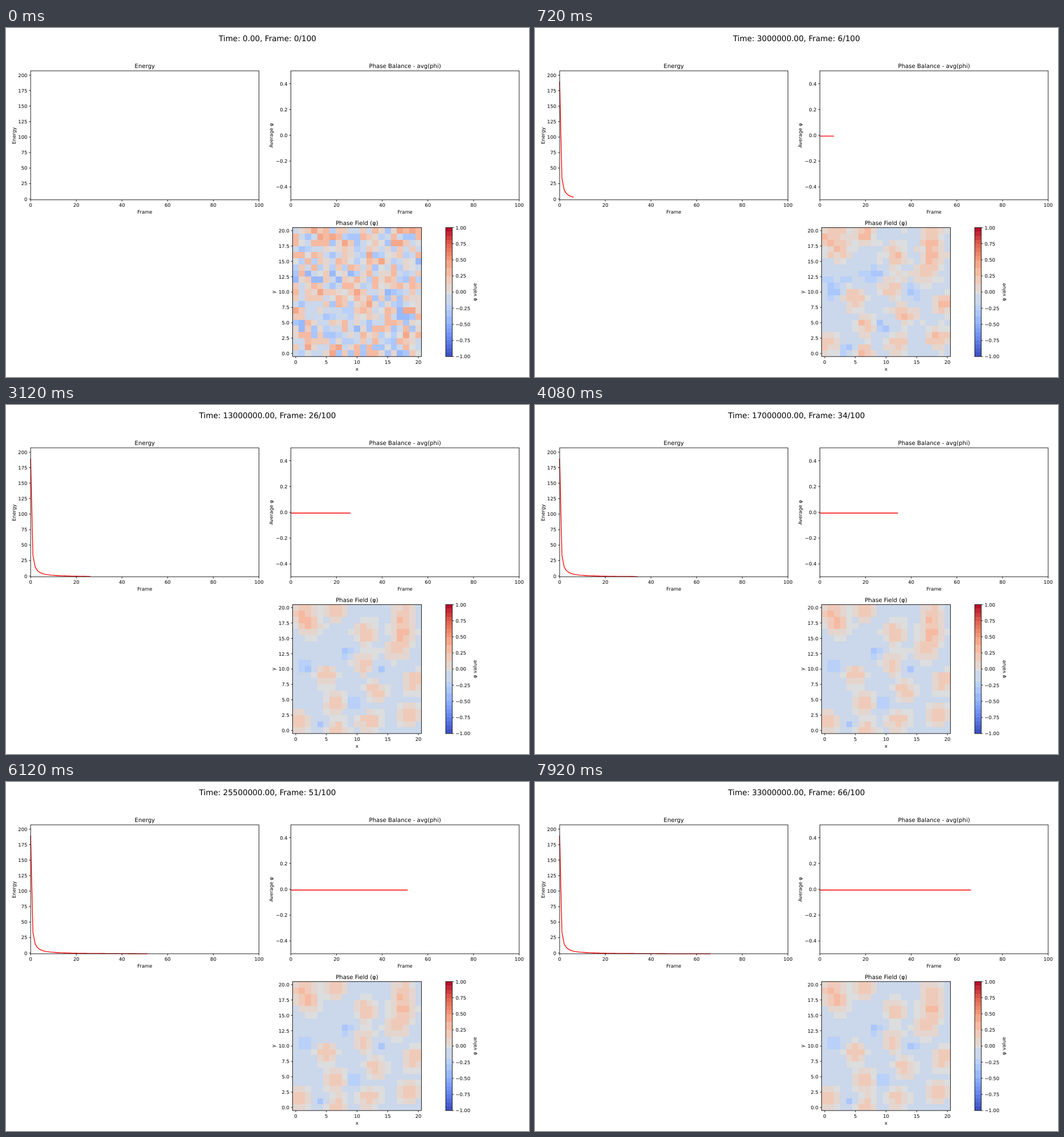
Animation of 917 by 611 pixels, one loop 8 s. Source, as an HTML page:

```html
<!DOCTYPE html>
<html lang="en">
<head>
<meta charset="utf-8">
<title>Phase field</title>
<style>
html, body { margin: 0; width: 100%; height: 100%; overflow: hidden; background: #fff; }
svg { display: block; width: 100%; height: 100%; }
text { font-family: "DejaVu Sans", Verdana, sans-serif; font-size: 8.45px; fill: #000; text-rendering: geometricPrecision; }
.title { font-size: 10.15px; }
.head { font-size: 13.55px; }
.axis { fill: none; stroke: #000; stroke-width: .85; }
.curve { fill: none; stroke: #f00; stroke-width: 1.3; stroke-linejoin: round; stroke-linecap: square; }
.cells { shape-rendering: crispEdges; }
</style>
</head>
<body>
<svg id="stage" viewBox="0 0 917 611"></svg>
<script>
const LOOP = 8000, STEP = 120, SIZE = 21;
const stage = document.getElementById('stage');

function add(tag, attrs, parent = stage, label) {
  const el = document.createElementNS('http://www.w3.org/2000/svg', tag);
  for (const key in attrs) el.setAttribute(key, attrs[key]);
  if (label !== undefined) el.textContent = label;
  parent.appendChild(el);
  return el;
}
const clamp = (v, lo, hi) => Math.max(lo, Math.min(hi, v));
const signed = (v, digits) => v.toFixed(digits).replace('-', '\u2212');
const text = (x, y, label, anchor = 'middle', cls = '') =>
  add('text', { x, y, 'text-anchor': anchor, class: cls }, stage, label);
const upright = (x, y, label) =>
  add('text', { 'text-anchor': 'middle', transform: `translate(${x} ${y}) rotate(-90)` }, stage, label);

// Diverging blue-red scale, shown in flat bands
const stops = ['3b4cc0', '6282ea', '8db0fe', 'b8d0f9', 'dddddd', 'f5c4ad', 'f49a7b', 'de604d', 'b40426']
  .map(h => [0, 2, 4].map(i => parseInt(h.slice(i, i + 2), 16)));
const edges = [-.48, -.38, -.28, -.21, -.03, .02, .13, .25, .37, .48];

function shade(v) {
  const p = (clamp(v, -1, 1) + 1) * 4, i = Math.min(7, Math.floor(p));
  return `rgb(${stops[i].map((a, k) => Math.round(a + (stops[i + 1][k] - a) * (p - i)))})`;
}
function band(v) {
  const i = edges.findIndex(e => v < e);
  if (i > 0) return shade((edges[i - 1] + edges[i]) / 2);
  return shade((Math.floor(v * 16) + .5) / 16);
}

// Settled field: soft hills and hollows around a few centres [column, row]
const hills = [[1, .5], [2, 3], [6.5, .5], [17.5, 1], [17.5, 4], [16.5, 7], [11.5, 4], [11, 9],
  [5, 11], [13, 13.5], [19.5, 12], [6.5, 15.5], [.5, 18.5], [12, 18.5], [18.5, 17.5], [6.5, 20]];
const hollows = [[1.5, 9.5], [9.5, 15.5], [4, 19], [14, 10], [8.5, 7.5]];

const bump = (c, r, spread) => (sum, [x, y]) =>
  sum + Math.exp(-((c - x) ** 2 + (r - y) ** 2) / spread);
const settled = (c, r) =>
  -.12 + .34 * hills.reduce(bump(c, r, 3.6), 0) - .22 * hollows.reduce(bump(c, r, 1.8), 0);

let seed = 20;
function noise() {
  seed = (seed * 1664525 + 1013904223) % 4294967296;
  return seed / 2147483648 - 1;
}

const energy = n => n ? 35 / n ** 1.13 - 1.5 : 189;

// Heat map
const map = { x: 502.6, y: 349.4, size: 225.8 };
const cell = map.size / SIZE;
const grid = add('g', { class: 'cells' });
const cells = [];
for (let r = 0; r < SIZE; r++) {
  for (let c = 0; c < SIZE; c++) {
    const el = add('rect', { x: map.x + c * cell, y: map.y + r * cell, width: cell + .1, height: cell + .1 }, grid);
    cells.push({ el, base: settled(c, r), rough: noise(), drift: noise() });
  }
}

// Colour bar
const bar = { x: 771, w: 11.4 };
const bands = 128, slice = map.size / bands;
for (let i = 0; i < bands; i++) {
  add('rect', { x: bar.x, y: map.y + i * slice, width: bar.w, height: slice + .1,
    fill: band(1 - (i + .5) * 2 / bands) }, grid);
}

const energyLine = add('path', { class: 'curve' });
const balanceLine = add('path', { class: 'curve' });

// Axes
const frame = (x, y, width, height) => add('rect', { x, y, width, height, class: 'axis' });
function tickX(x, y, label) {
  add('path', { d: `M${x} ${y}v2.9`, class: 'axis' });
  text(x, y + 12.5, label);
}
function tickY(x, y, label, side = -1) {
  add('path', { d: `M${x} ${y}h${side * 2.9}`, class: 'axis' });
  text(x + side * 5.8, y + 3.1, label, side < 0 ? 'end' : 'start');
}

const plotTop = 75, plotBottom = 300.8, plotWidth = 400.3;
const left = 43.2, right = 499.5;
const atX = (x0, n) => x0 + n * plotWidth / 100;
const energyY = e => 299.4 - e * 1.084;
const balanceY = v => 187.9 - v * 225.8;

for (const x0 of [left, right]) {
  frame(x0, plotTop, plotWidth, plotBottom - plotTop);
  for (let n = 0; n <= 100; n += 20) tickX(atX(x0, n), plotBottom, n);
  text(x0 + plotWidth / 2, 325.2, 'Frame');
}
for (let e = 0; e <= 200; e += 25) tickY(left, energyY(e), e);
for (let i = -2; i <= 2; i++) tickY(right, balanceY(i / 5), signed(i / 5, 1));
text(left + plotWidth / 2, 70, 'Energy', 'middle', 'title');
text(right + plotWidth / 2, 70, 'Phase Balance - avg(phi)', 'middle', 'title');
upright(17, 188.5, 'Energy');
upright(467.7, 188, 'Average φ');

const mid = map.x + map.size / 2, bottom = map.y + map.size;
frame(map.x, map.y, map.size, map.size);
frame(bar.x, map.y, bar.w, map.size);
for (let v = 0; v <= 20; v += 5) tickX(map.x + (v + .5) * cell, bottom, v);
for (let v = 0; v <= 20; v += 2.5) tickY(map.x, bottom - (v + .5) * cell, v.toFixed(1));
for (let i = -4; i <= 4; i++) {
  tickY(bar.x + bar.w, map.y + (4 - i) * map.size / 8, signed(i / 4, 2), 1);
}
text(mid, 344.6, 'Phase Field (φ)', 'middle', 'title');
text(mid, 599.6, 'x');
upright(472, 462.3, 'y');
upright(824.6, 462.3, 'φ value');
const heading = text(458.5, 22.7, '', 'middle', 'head');

let shown = -1;
function draw(time) {
  const n = Math.floor((time % LOOP) / STEP);
  if (n === shown) return;
  shown = n;
  heading.textContent = `Time: ${(n * 500000).toFixed(2)}, Frame: ${n}/100`;

  let d = '';
  for (let i = 0; n && i <= n; i++) d += `${i ? 'L' : 'M'}${atX(left, i)} ${energyY(energy(i))}`;
  energyLine.setAttribute('d', d);
  balanceLine.setAttribute('d', n ? `M${right} ${balanceY(-.006)}H${atX(right, n)}` : '');

  // Roughness fades with the square root of the energy; hills sharpen early, then relax
  const rough = .42 * Math.sqrt(Math.max(0, energy(n)) / 189);
  const drift = n ? .02 + .06 * Math.exp(-n / 25) : 0;
  const contrast = n ? 1 + .25 * Math.exp(-n / 12) : .4;
  for (const p of cells) {
    const v = p.base * contrast + p.rough * rough + p.drift * drift;
    p.el.setAttribute('fill', band(clamp(v, -.44, .44)));
  }
}

const start = performance.now();
function tick() {
  draw(performance.now() - start);
  requestAnimationFrame(tick);
}
tick();
</script>
</body>
</html>
```
